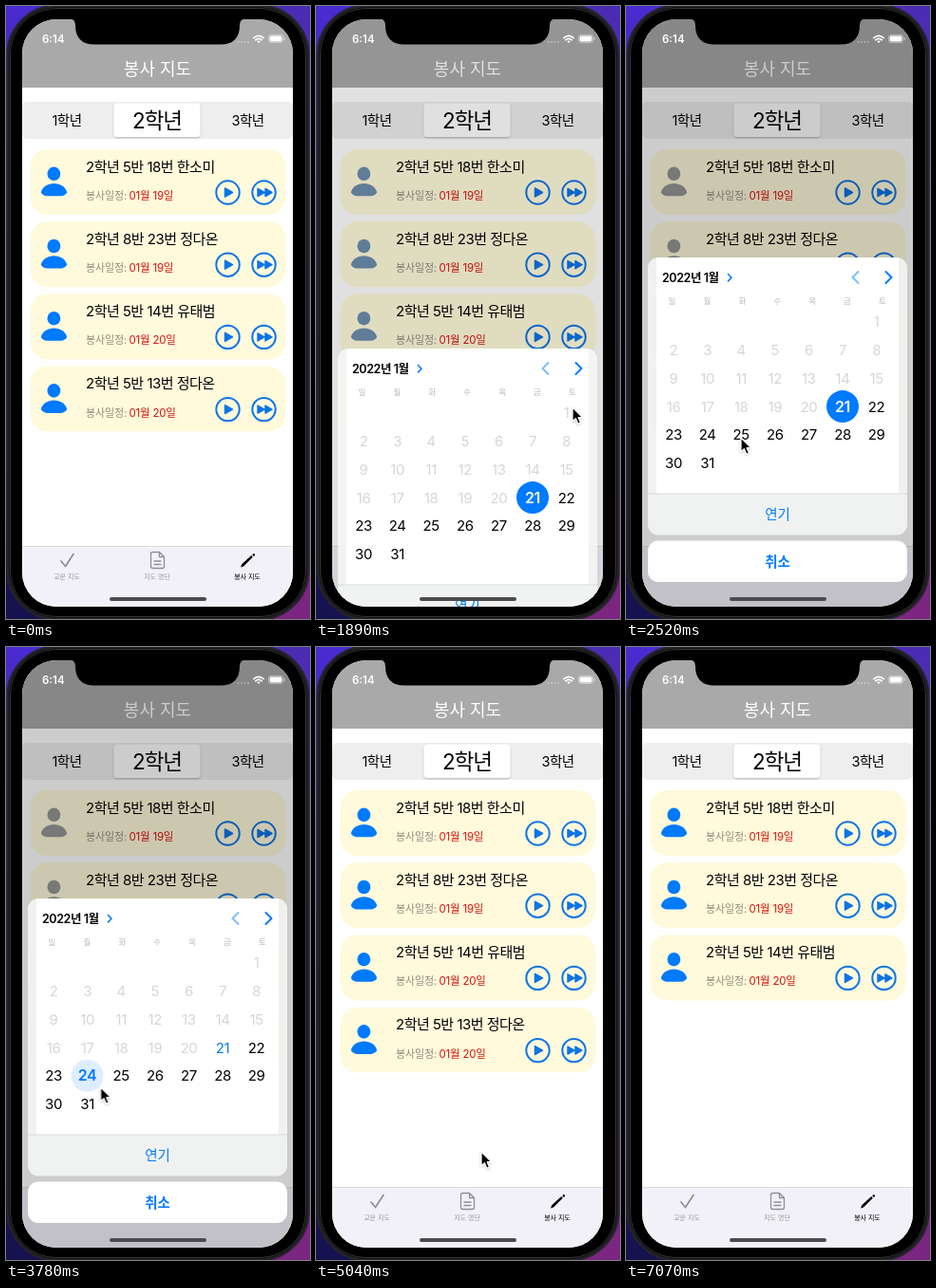
An HTML page for the animation above (7.28 s loop, 320 px wide and 646 px high).

```html
<!DOCTYPE html>
<html lang="ko">
<head>
<meta charset="utf-8">
<title>봉사 지도</title>
<style>
html, body { margin: 0; width: 100%; height: 100%; overflow: hidden; background: #000; }
svg { display: block; width: 320px; height: 646px; font-family: Inter, 'Noto Sans CJK KR', 'Noto Sans CJK', sans-serif; }
.mid { text-anchor: middle; }
.title { font-size: 15px; letter-spacing: -.5px; }
.plan { font-size: 11px; letter-spacing: -.15px; fill: #8c8a80; }
.plan tspan { font-size: 11.5px; letter-spacing: -.2px; fill: #d8140f; }
.tab { font-size: 7px; fill: #999; text-anchor: middle; }
.tab.on { fill: #000; font-weight: 500; }
.seg { font-size: 14.5px; letter-spacing: -.5px; text-anchor: middle; }
.week { font-size: 8.5px; fill: #b8b8bb; text-anchor: middle; }
.day { font-size: 15px; letter-spacing: -.4px; text-anchor: middle; }
.day.past { fill: #d6d6d8; }
.day.picked { font-size: 16px; font-weight: 600; }
.blue { fill: #007aff; }
.line { fill: none; stroke-linecap: round; stroke-linejoin: round; }
.buttons { --ink: color-mix(in srgb, currentColor 85%, #555); fill: var(--ink); stroke: var(--ink); }

.tint, .dim, .sheet, .before, .after, .press, .last, .cursor { animation: 7280ms step-end infinite; }
.tint { color: #007aff; animation-name: tint; }
.dim { animation-name: dim; }
.sheet { animation-name: sheet; }
.before { animation-name: before; }
.after { animation-name: after; }
.press { animation-name: press; }
.last { animation-name: last; }
.cursor { animation-name: cursor; }

@keyframes sheet {
  0%, 69.22%, 100% { transform: translateY(390px); }
  25.95% { transform: translateY(96px); }
  26.92% { transform: translateY(45px); }
  27.88% { transform: translateY(20px); }
  28.84% { transform: translateY(8px); }
  29.8% { transform: translateY(3px); }
  30.76% { transform: translateY(0); }
  62.49% { transform: translateY(21px); }
  63.45% { transform: translateY(88px); }
  64.41% { transform: translateY(180px); }
  65.38% { transform: translateY(262px); }
  66.34% { transform: translateY(320px); }
  67.3% { transform: translateY(355px); }
  68.26% { transform: translateY(375px); }
}
@keyframes dim {
  0%, 69.22%, 100% { opacity: 0; }
  25.95% { opacity: .12; }
  26.92% { opacity: .17; }
  27.88% { opacity: .19; }
  28.84% { opacity: .2; }
  62.49% { opacity: .195; animation-timing-function: steps(7); }
}
@keyframes tint {
  0%, 69.22%, 100% { color: #007aff; }
  25.95% { color: #6c8ead; }
  26.92% { color: #8794a2; }
  27.88% { color: #949698; }
  28.84% { color: #969696; }
  62.49% { color: #949698; animation-timing-function: steps(7); }
}
@keyframes before {
  0% { opacity: 1; }
  45.19% { opacity: 1; animation-timing-function: steps(3); }
  48.07%, 100% { opacity: 0; }
}
@keyframes after {
  0% { opacity: 0; }
  45.19% { opacity: 0; animation-timing-function: steps(3); }
  48.07%, 100% { opacity: 1; }
}
@keyframes press {
  0%, 59.61%, 100% { opacity: 0; }
  58.65% { opacity: 1; }
}
@keyframes last {
  0% { opacity: 1; }
  74.03% { opacity: .5; }
  74.99%, 100% { opacity: 0; }
}
@keyframes cursor {
  0% { transform: translate(270px, 650px); animation-timing-function: steps(11); }
  10.57% { transform: translate(232px, 403px); }
  11.53% { transform: translate(232px, 403px); animation-timing-function: steps(3); }
  14.42% { transform: translate(281px, 428px); animation-timing-function: steps(2); }
  16.34% { transform: translate(270px, 423px); }
  31.73% { transform: translate(270px, 423px); animation-timing-function: steps(3); }
  34.61% { transform: translate(121px, 455px); animation-timing-function: steps(2); }
  36.53% { transform: translate(78px, 500px); animation-timing-function: steps(2); }
  38.46% { transform: translate(140px, 524px); }
  40.38% { transform: translate(140px, 524px); animation-timing-function: steps(3); }
  43.26% { transform: translate(61px, 426px); }
  44.22% { transform: translate(81px, 447px); }
  50.96% { transform: translate(81px, 447px); animation-timing-function: steps(5); }
  55.76% { transform: translate(174px, 532px); }
  86.53% { transform: translate(174px, 532px); animation-timing-function: steps(5); }
  91.34%, 100% { transform: translate(271px, 650px); }
}
</style>
</head>
<body>
<svg viewBox="0 0 320 646">
  <defs>
    <linearGradient id="wallL" x2="0" y2="1"><stop stop-color="#4a2bd0"/><stop offset="1" stop-color="#15124e"/></linearGradient>
    <linearGradient id="wallR" x2="0" y2="1"><stop stop-color="#4a2cb4"/><stop offset="1" stop-color="#7c2580"/></linearGradient>
    <clipPath id="screen"><rect x="17" y="14" width="285" height="619" rx="36"/></clipPath>
    <clipPath id="card"><rect x="23" y="265" width="273" height="292.5" rx="11"/></clipPath>
    <filter id="soft" x="-20%" y="-20%" width="140%" height="150%"><feDropShadow dx="0" dy="1" stdDeviation="1.2" flood-opacity=".25"/></filter>
    <g id="person">
      <ellipse cx="50.4" cy="25.8" rx="6.9" ry="7.3"/>
      <path d="M36.8 45.500c1.500-6 7-9.500 13.700-9.500s12.200 3.500 13.700 9.500q-2.500 3.800-6.200 3.800h-15q-3.700 0-6.200-3.800z"/>
    </g>
    <g id="buttons" stroke-linejoin="round">
      <circle cx="233.500" cy="45.500" r="12.200" fill="none" stroke-width="2"/>
      <circle cx="271.500" cy="45.500" r="12.200" fill="none" stroke-width="2"/>
      <path d="M230.500 41v9l8-4.500zM265 41.500v8l7-4zM273 41.500v8l7-4z" stroke-width="1.500"/>
    </g>
  </defs>

  <rect width="160" height="646" fill="url(#wallL)"/>
  <rect x="160" width="160" height="646" fill="url(#wallR)"/>
  <rect x="2" y="0" width="316" height="646" rx="51" fill="#000" stroke="#242428" stroke-width="3"/>
  <rect x="4.500" y="2.500" width="311" height="641" rx="48" fill="#000" stroke="#36363a"/>

  <g clip-path="url(#screen)">
    <rect x="17" y="14" width="285" height="619" fill="#fff"/>
    <rect x="17" y="14" width="285" height="72" fill="#a9a9a9"/>
    <text class="mid" x="159.500" y="73" font-size="18" fill="#fff">봉사 지도</text>

    <rect x="17" y="101" width="285" height="39" rx="5" fill="#eee"/>
    <rect x="113.500" y="102.500" width="91" height="35.500" rx="4" fill="#fff" filter="url(#soft)"/>
    <text class="seg" x="64" y="125.500">1학년</text>
    <text class="mid" x="159" y="128.500" font-size="22.500" letter-spacing="-1">2학년</text>
    <text class="seg" x="254.500" y="125.500">3학년</text>

    <g id="list" class="tint"></g>

    <rect x="17" y="570" width="285" height="63" fill="#f2f1f8"/>
    <path d="M17 569.500h285" stroke="#d2d2d6" stroke-width=".8"/>
    <path class="line" d="M58 585l4.500 5.500 8.500-13" stroke="#8e8e92" stroke-width="1.700"/>
    <g class="line" stroke="#8e8e92" stroke-width="1.300">
      <path d="M154.500 575.500h7l5 5v10q0 2-2 2h-10q-2 0-2-2v-13q0-2 2-2zM161.500 575.500v5h5M156 585h7M156 588.500h7"/>
    </g>
    <path d="M247 591.500l1.200-3.200 10-9.300 1.600 1.700-9.800 9.700zM259.200 578.200l1-.9q.8-.5 1.500.2t.2 1.500l-1 .9z"/>
    <text class="tab" x="64" y="603.800">교문 지도</text>
    <text class="tab" x="159" y="603.800">지도 명단</text>
    <text class="tab on" x="254" y="603.800">봉사 지도</text>

    <rect class="dim" x="17" y="14" width="285" height="619"/>

    <g class="sheet">
      <g clip-path="url(#card)">
        <rect x="23" y="265" width="273" height="293" fill="#f7faf8" fill-opacity=".84"/>
        <rect x="32" y="265" width="255" height="249" fill="#fff"/>
        <rect class="press" x="23" y="514" width="273" height="44" fill="#000" fill-opacity=".08"/>
        <path d="M23 514h273" stroke="#cfd1d1" stroke-width=".7"/>
      </g>
      <text x="38" y="290.500" font-size="12.500" font-weight="600" letter-spacing="-.42">2022년 1월</text>
      <g class="line" stroke="#007aff">
        <path d="M107.500 282.500l3.500 3.700-3.500 3.700" stroke-width="1.600"/>
        <path d="M244.500 280l-6 6 6 6" stroke-width="2" opacity=".5"/>
        <path d="M273.500 280l6 6-6 6" stroke-width="2"/>
      </g>
      <g id="month"></g>
      <text class="mid blue" x="159.500" y="541.300" font-size="14.500">연기</text>
      <rect x="23" y="563.500" width="273" height="43.500" rx="11" fill="#fff"/>
      <text class="mid blue" x="159.500" y="590.800" font-size="14.500" font-weight="600">취소</text>
    </g>
  </g>

  <path d="M66 13q7 .5 7 7 0 20.500 20 20.500h133q20 0 20-20.500 0-6.500 7-7z"/>
  <g fill="#fff">
    <text x="38" y="38.800" font-size="11.500" font-weight="600">6:14</text>
    <g opacity=".4">
      <circle cx="244.500" cy="38" r=".9"/><circle cx="248" cy="38" r=".9"/><circle cx="251.500" cy="38" r=".9"/><circle cx="255" cy="38" r=".9"/>
    </g>
    <g class="line" stroke="#fff" stroke-width="1.700" stroke-linecap="butt">
      <path d="M260.800 33.600q5.200-4.600 10.400 0M262.700 35.800q3.300-2.800 6.600 0"/>
    </g>
    <path d="M264.200 37.200q1.800-1.400 3.600 0l-1.800 1.900z"/>
    <rect x="276.400" y="30.400" width="15.200" height="8.200" rx="2.400" fill="none" stroke="#fff" stroke-width=".8" opacity=".5"/>
    <rect x="277.600" y="31.600" width="12.800" height="5.800" rx="1.400"/>
    <rect x="292.500" y="33" width="1.100" height="3" rx=".5" opacity=".5"/>
  </g>
  <rect x="109" y="623" width="102" height="4" rx="2" fill="#4c4c50"/>

  <g class="cursor">
    <path d="M0 0v14.800l3.400-3.100 2.400 5.500 2.700-1.200-2.400-5.300h4.700z" stroke="#fff" stroke-width="1.200" stroke-linejoin="round" filter="url(#soft)"/>
  </g>
</svg>
<script>
const rows = [
  ['2학년 5반 18번 한소미', '01월 19일'],
  ['2학년 8반 23번 정다온', '01월 19일'],
  ['2학년 5반 14번 유태범', '01월 20일'],
  ['2학년 5반 13번 정다온', '01월 20일']
];
const card = ([title, date], i) => `
  <g transform="translate(0 ${151 + i * 76.2})"><g class="${i === 3 ? 'last' : ''}">
    <rect x="25.500" width="269" height="69" rx="18" fill="#fffadb"/>
    <use href="#person" fill="currentColor"/>
    <use href="#buttons" class="buttons"/>
    <text class="title" x="84" y="23.700">${title}</text>
    <text class="plan" x="84" y="53">봉사일정: <tspan x="129.500">${date}</tspan></text>
  </g></g>`;
document.getElementById('list').innerHTML = rows.map(card).join('');

const label = (n, x, y, kind = '') => `<text class="day ${kind}" x="${x}" y="${y + 5.5}">${n}</text>`;
const disc = (x, y, fill) => `<circle cx="${x}" cy="${y}" r="17" fill="${fill}"/>`;

function day(n) {
  const cell = n + 5;
  const x = 50 + cell % 7 * 35.6;
  const y = 332.7 + Math.floor(cell / 7) * 29.8;
  if (n === 21) {
    return `<g class="before" fill="#fff">${disc(x, y, '#007aff')}${label(n, x, y, 'picked')}</g>
      <g class="after">${label(n, x, y, 'blue')}</g>`;
  }
  if (n === 24) {
    return `<g class="before">${label(n, x, y)}</g>
      <g class="after">${disc(x, y, '#deedff')}${label(n, x, y, 'picked blue')}</g>`;
  }
  return label(n, x, y, n < 21 ? 'past' : '');
}
const week = [...'일월화수목금토'].map((d, i) => `<text class="week" x="${48.5 + i * 36.9}" y="314.200">${d}</text>`);
const days = Array.from({ length: 31 }, (_, i) => day(i + 1));
document.getElementById('month').innerHTML = week.concat(days).join('');
</script>
</body>
</html>
```
